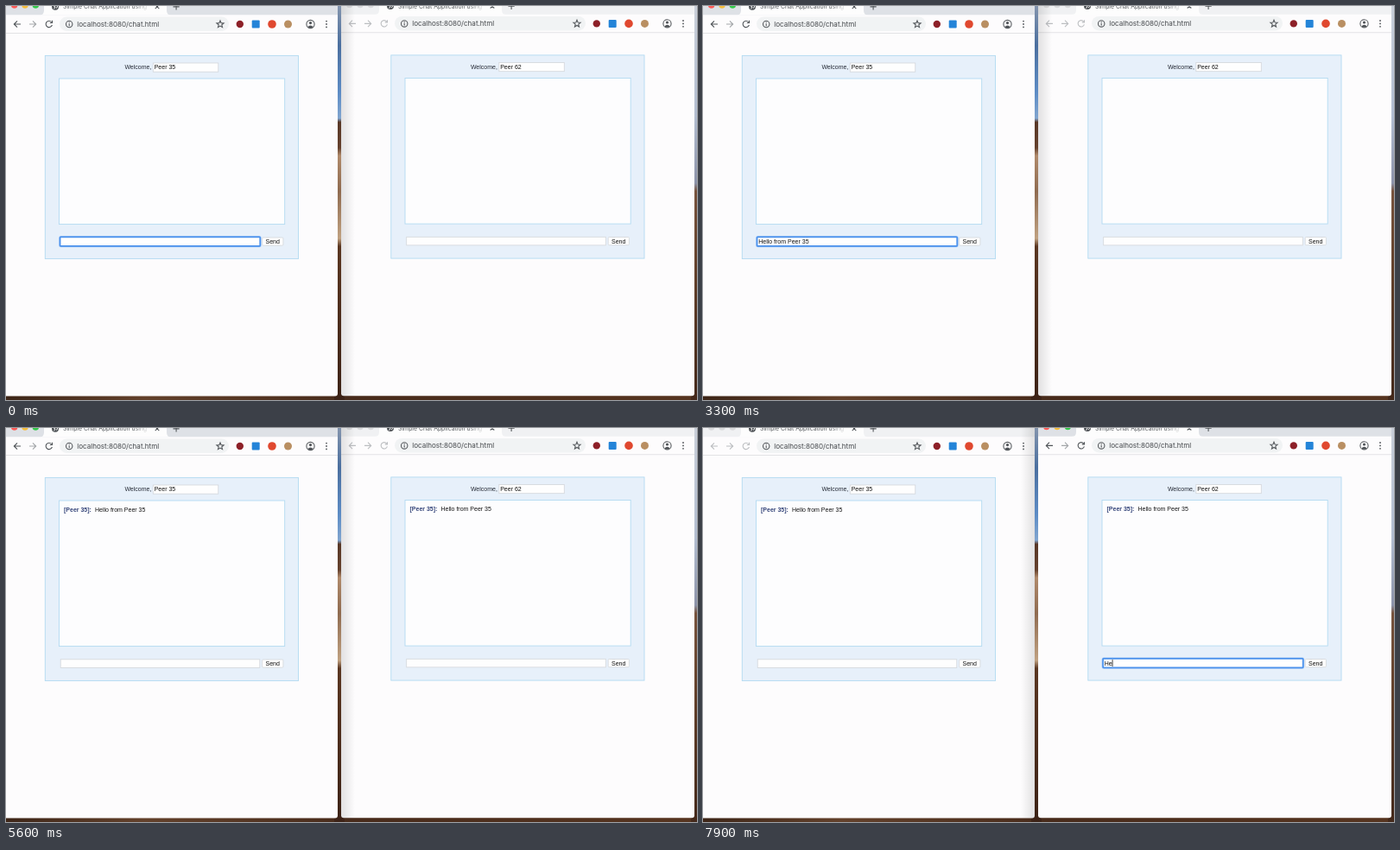
Write an HTML page that moves like this. It is 800 by 456 pixels and loops after 8000 ms.

```html
<!DOCTYPE html>
<html lang="en">
<head>
<meta charset="utf-8">
<title>Chat in two windows</title>
<style>
html, body { margin: 0; width: 100%; height: 100%; overflow: hidden; background: #46291a; }
svg { display: block; width: 800px; height: 456px; }
text { font: 7px "Liberation Sans", Arial, sans-serif; fill: #111; white-space: pre; }
.ui { font: 8.05px Inter, Roboto, sans-serif; fill: #45484c; }
.tab-title { font-size: 6.9px; fill: #55585c; }
.welcome { fill: #252a35; }
.sender { font-weight: bold; fill: #35457a; }
.strip { fill: #f0f1f3; }
.active .strip { fill: #dee1e6; }
.light { fill: #d9dadc; }
.lit .red { fill: #fc5b57; }
.lit .yellow { fill: #f6bd3b; }
.lit .green { fill: #34c84a; }
.icon { fill: none; stroke: #55595d; stroke-width: 1.1; }
.nav { stroke: #bcbec1; }
.active .nav { stroke: #505458; }
.active .forward { stroke: #a3a6a9; }
.field { fill: #fefefe; stroke: #d3d6da; stroke-width: .8; }
.ring { fill: #fff; stroke: #4c92ec; stroke-width: 1.7; }
.glow { fill: none; stroke: #a5caf7; stroke-width: 3; }
</style>
</head>
<body>
<svg id="stage" viewBox="0 0 800 456"></svg>
<script>
const LOOP = 8000;
const names = ['Peer 35', 'Peer 62'];
const message = 'Hello from ' + names[0];
const SEND = 4100, RAISE = 6000, ACTIVATE = 6200, CLICK = 6700;

// Times at which each character lands.
const typedLeft = [700, 800, 900, 1000, 1100, 1200, 1300, 1400, 1500, 1600, 1700,
  1800, 1900, 2100, 2200, 2400, 2700, 2800];
const typedRight = [7500, 7700];

const rect = (x, y, w, h, attrs = '') =>
  `<rect x="${x}" y="${y}" width="${w}" height="${h}" ${attrs}/>`;
const circle = (x, y, r, attrs = '') => `<circle cx="${x}" cy="${y}" r="${r}" ${attrs}/>`;
const path = (d, attrs = 'class="icon"') => `<path d="${d}" ${attrs}/>`;
const text = (x, y, str, cls = '') => `<text x="${x}" y="${y}" class="${cls}">${str}</text>`;
const gradient = (id, stops, dir) => `<linearGradient id="${id}" ${dir}>` +
  stops.map(([at, color, alpha = 1]) =>
    `<stop offset="${at}" stop-color="${color}" stop-opacity="${alpha}"/>`).join('') +
  '</linearGradient>';

function star(x, y) {
  const points = Array.from({ length: 10 }, (_, i) => {
    const r = i % 2 ? 1.9 : 4.3, a = i * Math.PI / 5;
    return `${(x + r * Math.sin(a)).toFixed(2)} ${(y - r * Math.cos(a)).toFixed(2)}`;
  });
  return path(`M${points.join('L')}Z`, 'class="icon" stroke-width=".9"');
}

function toolbar(shift) {
  const x = n => n + shift;
  return path('M17 21H9.5M13 17.3L9.3 21L13 24.7', 'class="icon nav"') +
    path('M27 21H34.5M31 17.3L34.7 21L31 24.7', 'class="icon nav forward"') +
    path('M52.7 18.5A3.7 3.7 0 1 0 53.4 22M53.5 16.8V19.5H50.8', 'class="icon nav"') +
    rect(62, 12.5, 196 + shift, 16.5, 'rx="8.2" fill="#f1f3f4"') +
    circle(73.2, 21, 3.7, 'class="icon"') + path('M73.2 20.4V23.2M73.2 18.6V19.6') +
    text(82.3, 23.8, 'localhost:8080/chat.html', 'ui') +
    star(x(248), 21.2) +
    circle(x(270.8), 21, 4.2, 'fill="#8d2028"') +
    rect(x(284.7), 16.6, 9, 9, 'rx="1" fill="#2484d8"') +
    circle(x(308), 21, 4.8, 'fill="#e0482f"') +
    circle(x(326.5), 21, 4.5, 'fill="#b98f62"') +
    circle(x(352.5), 21, 4.6, 'class="icon"') +
    circle(x(352.5), 19.6, 1.6, 'fill="#505458"') +
    path(`M${x(349.3)} 24.1Q${x(352.5)} 20.8 ${x(355.7)} 24.1Q${x(352.5)} 26.5 ${x(349.3)} 24.1Z`, 'fill="#505458"') +
    [17.6, 21, 24.4].map(y => circle(x(371), y, .9, 'fill="#505458"')).join('');
}

function tabs() {
  return ['red', 'yellow', 'green'].map((c, i) =>
      circle(9.7 + i * 12.3, -.9, 3.7, `class="light ${c}"`)).join('') +
    path('M39 10.5Q44 10.5 44 5V-9H186V5Q186 10.5 191 10.5Z', 'fill="#fdfdfd"') +
    circle(57, .7, 4, 'fill="#505458"') +
    path('M54.2 -.8L57 1L55.6 3.3M57.5 -2L59.8 1L58 2.4', 'fill="none" stroke="#fff" stroke-width="1"') +
    text(66, 3.3, 'Simple Chat Application using', 'ui tab-title') +
    rect(147, -4, 20, 10, 'fill="url(#fade)"') +
    path('M172.7 -1.5L177.3 3.1M177.3 -1.5L172.7 3.1') +
    path('M193.5 .9H200.7M197.1 -2.7V4.5', 'class="icon" stroke-width="1.3"');
}

function chat(i) {
  return `<g transform="translate(${i * 400.5} ${i * -.5})">` +
    rect(45.3, 57.4, 293.2, 235.2, 'fill="#e7f0fa" stroke="#b2daf1" stroke-width=".9"') +
    text(137.4, 73.4, 'Welcome,', 'welcome') +
    rect(170.3, 66, 75.5, 10.2, 'class="field"') +
    text(171.7, 73.4, names[i]) +
    rect(61.5, 84, 261.2, 168.6, 'fill="#fdfdfe" stroke="#b2daf1" stroke-width=".9"') +
    `<g id="log${i}">` + text(67, 96.5, `[${names[i && 0]}]:`, 'sender') +
    text(103, 96.5, message) + '</g>' +
    rect(63.2, 267.8, 230.6, 9.6, 'class="field"') +
    `<g id="focus${i}">` + rect(62.6, 267.4, 231.6, 10.4, 'class="glow" rx="1"') +
    rect(62.6, 267.4, 231.6, 10.4, 'class="ring" rx=".8"') + '</g>' +
    `<text id="input${i}" x="64.2" y="275.1"></text>` +
    rect(64.2, 268.6, .8, 8, `id="caret${i}" fill="#111"`) +
    rect(296.7, 268, 24.2, 9.2, 'rx="1" class="field"') +
    text(300.5, 275.1, 'Send') + '</g>';
}

function browser(i) {
  const left = i ? 388 : -4, width = i ? 409 : 388, bottom = i ? 451.2 : 451.6;
  return `<g id="win${i}"><g clip-path="url(#clip${i})">` +
    rect(left, -10, width, 470, 'fill="#fdfcfd"') +
    rect(left, -10, width, 20.3 - i * .6, 'class="strip"') +
    `<g transform="translate(${i * 388} ${i * -.6})">${tabs()}${toolbar(i * 25)}</g>` +
    rect(left, 31 - i * .6, width, .8, 'fill="#dcdde0"') +
    chat(i) +
    rect(i ? 388 : 368, 0, 16, 452, `id="shade${i}" fill="url(#shade${i}fill)"`) +
    `</g></g><clipPath id="clip${i}">` + rect(left, -10, width, bottom + 10, 'rx="3"') + '</clipPath>';
}

const down = 'x1="0" y1="0" x2="0" y2="1"';
document.getElementById('stage').innerHTML = '<defs>' +
  gradient('fade', [[0, '#fdfdfd', 0], [1, '#fdfdfd']], '') +
  gradient('shade0fill', [[0, '#000', 0], [1, '#000', .11]], '') +
  gradient('shade1fill', [[0, '#000', .11], [1, '#000', 0]], '') +
  gradient('sky', [[0, '#8394ad'], [.1, '#4b6f9f'], [.22, '#5d8cc5'], [.285, '#81a5cf'], [.295, '#593827'],
    [.36, '#65412d'], [.38, '#b08a6b'], [.47, '#8f6b50'], [.59, '#c0a181'], [.61, '#5a3621'], [1, '#3c2216']], down) +
  gradient('side', [[0, '#c9cfd9'], [.28, '#b2bdd0'], [.45, '#8c93a9'], [.47, '#77533d'],
    [.7, '#5f3d28'], [1, '#43281a']], down) +
  gradient('ground', [[0, '#3d2517'], [.2, '#62402a'], [.5, '#472a1a'], [1, '#56341f']], '') +
  '</defs>' +
  rect(0, 440, 800, 16, 'fill="url(#ground)"') +
  rect(380, 0, 12, 456, 'fill="url(#sky)"') +
  rect(793, 0, 7, 456, 'fill="url(#side)"') +
  browser(0) + browser(1);

const get = id => document.getElementById(id);
const show = (id, on) => get(id).setAttribute('visibility', on ? 'visible' : 'hidden');

function setInput(i, t, focused, since, keys, sent) {
  const done = keys.filter(k => k <= t);
  const value = sent ? '' : message.slice(0, done.length);
  const input = get('input' + i);
  if (input.textContent !== value) input.textContent = value;
  const caret = get('caret' + i);
  caret.setAttribute('x', 64.2 + (value ? input.getComputedTextLength() : 0));
  const rest = t - (done.length ? done[done.length - 1] : since);
  show('caret' + i, focused && Math.floor(rest / 500) % 2 === 0);
  show('focus' + i, focused);
}

function draw(t) {
  const sent = t >= SEND;
  const front = t >= RAISE ? 1 : 0, active = t >= ACTIVATE ? 1 : 0;
  for (const i of [0, 1]) {
    get('win' + i).setAttribute('class', (front === i ? 'lit ' : '') + (active === i ? 'active' : ''));
    show('shade' + i, front !== i);
    show('log' + i, sent);
  }
  setInput(0, t, !sent, -500, typedLeft, sent);
  setInput(1, t, t >= CLICK, CLICK, typedRight, false);
}

const start = performance.now();
function tick() {
  draw((performance.now() - start) % LOOP);
  requestAnimationFrame(tick);
}
tick();
</script>
</body>
</html>
```
